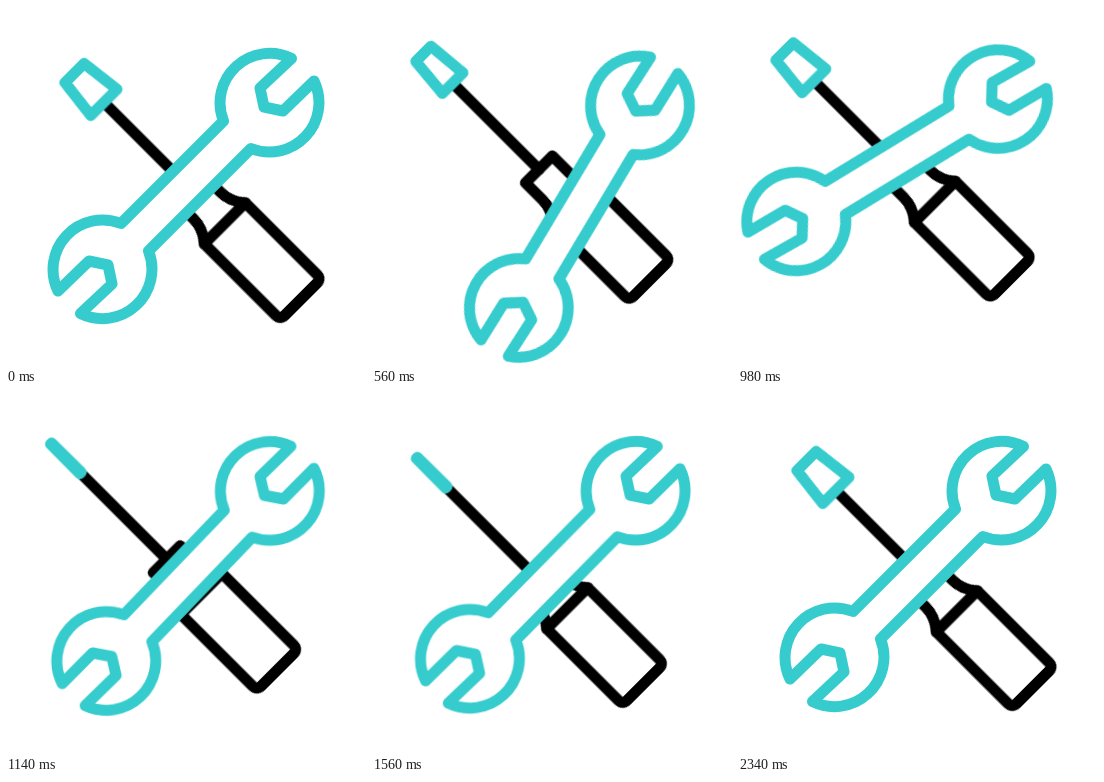
An HTML page for the animation above (2400 ms loop, 360 by 360 pixels).

```html
<!DOCTYPE html>
<html lang="en">
<head>
<meta charset="utf-8">
<title>Tools</title>
<style>
html, body { margin: 0; width: 100%; height: 100%; overflow: hidden; background: #fff; }
svg { display: block; width: 360px; height: 360px; }
path { fill: none; stroke: #000; stroke-width: 11; stroke-linecap: round; stroke-linejoin: round; }
.teal { stroke: #36cccd; fill: #fff; }

.shift-x, .shift-y, .blade, .wrench {
  animation: 2400ms cubic-bezier(.37, 0, .63, 1) infinite;
}
.shift-x { animation-name: shift-x; }
.shift-y { animation-name: shift-y; }
.blade { animation-name: spin; }
.wrench { animation-name: swing; transform-origin: 277px 80px; }

@keyframes shift-x {
  0%, 97.5%, 100% { transform: translateX(0); }
  32.5% { transform: translateX(-21px); }
  59.17% { transform: translateX(-25px); }
}
@keyframes shift-y {
  0%, 97.5%, 100% { transform: translateY(0); }
  32.5% { transform: translateY(-23.5px); }
  78.75% { transform: translateY(2px); }
}
/* The blade turns about the long axis of the screwdriver. */
@keyframes spin {
  0%, 20.42%, 39.17%, 56.25%, 73.75%, 100% { d: path("M96.5 -13.5L138 -18.5L138 18.5L96.5 13.5Z"); }
  10.21%, 29.79%, 47.5%, 65% { d: path("M96.5 -.8L138 -1L138 1L96.5 .8Z"); }
}
@keyframes swing {
  0%, 91.67%, 100% { transform: rotate(0deg); }
  22.08%, 55.42% { transform: rotate(-14.6deg); }
  38.75% { transform: rotate(14.8deg); }
  73.33% { transform: rotate(10.7deg); }
}
</style>
</head>
<body>
<svg viewBox="0 0 360 360" width="360" height="360">
  <g class="shift-x"><g class="shift-y">
    <g transform="translate(.3 -1.2) rotate(45)">
      <path d="M142 0H260"/>
      <path d="M309 -29Q298 -19 284 -19H260V19H284Q298 19 309 29"/>
      <path d="M309 -29H410Q416.5 -29 416.5 -22.5V22.5Q416.5 29 410 29H309Z"/>
      <path class="teal blade" d="M96.5 -13.5L138 -18.5L138 18.5L96.5 13.5Z"/>
    </g>
  </g></g>
  <path class="teal wrench" d="M285.5 52.5A49.5 49.5 0 0 0 217.5 115L115 217.5A49.5 49.5 0 0 0 52 285L83 255L102 259L106 278L74.5 307.5A49.5 49.5 0 0 0 142.5 245L245 142.5A49.5 49.5 0 0 0 308 75L277 105L258 101L254 82Z"/>
</svg>
</body>
</html>
```
